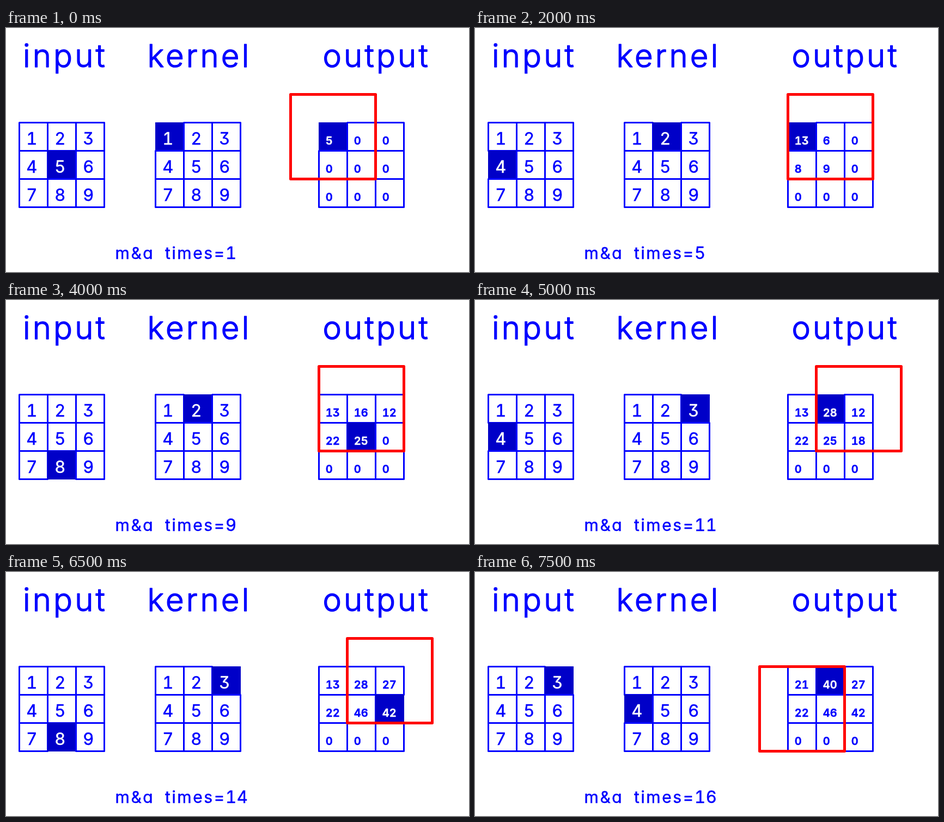
Write an HTML page that moves like this. It is 850 px wide and 450 px high and loops after 8 s.

```html
<!DOCTYPE html>
<html lang="en">
<head>
<meta charset="utf-8">
<title>Convolution step by step</title>
<style>
  html, body { margin: 0; width: 100%; height: 100%; overflow: hidden; background: #fff; }
  svg { display: block; }
  text {
    font: 400 31px Inter, "Open Sans", sans-serif;
    font-feature-settings: "tnum", "cv09", "cv11";
    fill: #00f;
    stroke: #00f;
    stroke-width: .5;
    stroke-linejoin: round;
  }
  .title { font-size: 58px; font-weight: 300; letter-spacing: 4.2px; stroke-width: 1.3; }
  .digit { text-anchor: middle; }
  .sum { font-size: 20px; font-weight: 600; }
  .status { font-size: 30px; letter-spacing: 2.6px; }
  .count { letter-spacing: .6px; }
  .cell { fill: none; stroke: #00f; stroke-width: 3; stroke-linejoin: round; }
  .on rect { fill: #0000c8; }
  .on text { fill: #fff; stroke: #fff; }
  .window { fill: none; stroke: #f00; stroke-width: 5; stroke-linejoin: round; }
</style>
</head>
<body>
<svg width="850" height="450" viewBox="0 0 850 450">
  <text class="title" x="31" y="72">input</text>
  <text class="title" x="259.5" y="72">kernel</text>
  <text class="title" x="581.5" y="72">output</text>
  <text class="status" x="200.5" y="426">m&amp;a</text>
  <text class="status" x="292" y="426">times=</text>
  <text class="count" id="count" x="403" y="426"></text>
  <g id="grids"></g>
  <rect class="window" id="win" width="156" height="156"/>
</svg>
<script>
const CELL = 52, TOP = 174, OUT_X = 574, STEP_MS = 500, STEPS = 16;
const digits = [1, 2, 3, 4, 5, 6, 7, 8, 9];
const $ = id => document.getElementById(id);

// Each kernel cell k adds input[i] * kernel[k] to output[o], where i = o + 1 - k per axis.
function buildSteps() {
  const steps = [], sums = Array(9).fill(0);
  for (let k = 0; k < 9; k++) {
    for (let o = 0; o < 9; o++) {
      const row = Math.floor(o / 3) + 1 - Math.floor(k / 3);
      const col = o % 3 + 1 - k % 3;
      if (row < 0 || row > 2 || col < 0 || col > 2) continue;
      const i = row * 3 + col;
      sums[o] += digits[i] * digits[k];
      steps.push({ i, k, o, sums: [...sums] });
    }
  }
  return steps.slice(0, STEPS);
}

function grid(left, values, active, label) {
  return values.map((value, n) => {
    const x = left + n % 3 * CELL, y = TOP + Math.floor(n / 3) * CELL;
    const on = n === active;
    const box = on
      ? `<rect x="${x}" y="${y}" width="${CELL + 1}" height="${CELL + 1}"/>`
      : `<rect class="cell" x="${x + .5}" y="${y + .5}" width="${CELL}" height="${CELL}"/>`;
    const dx = label === "sum" ? 12.8 : 23.3;
    return `<g class="${on ? "on" : ""}">${box}` +
      `<text class="${label}" x="${x + dx}" y="${y + 40.5}">${value}</text></g>`;
  }).join("");
}

const steps = buildSteps();
let shown = -1;

function draw(now) {
  const index = Math.floor(now / STEP_MS) % STEPS;
  if (index !== shown) {
    shown = index;
    const { i, k, o, sums } = steps[index];
    $("grids").innerHTML =
      grid(24, digits, i, "digit") +
      grid(274, digits, k, "digit") +
      grid(OUT_X, sums, o, "sum");
    $("win").setAttribute("x", OUT_X + .5 + (k % 3 - 1) * CELL);
    $("win").setAttribute("y", TOP + .5 + (Math.floor(k / 3) - 1) * CELL);
    $("count").textContent = index + 1;
  }
}

const start = performance.now();
function loop() {
  draw(performance.now() - start);
  requestAnimationFrame(loop);
}
loop();
</script>
</body>
</html>
```
